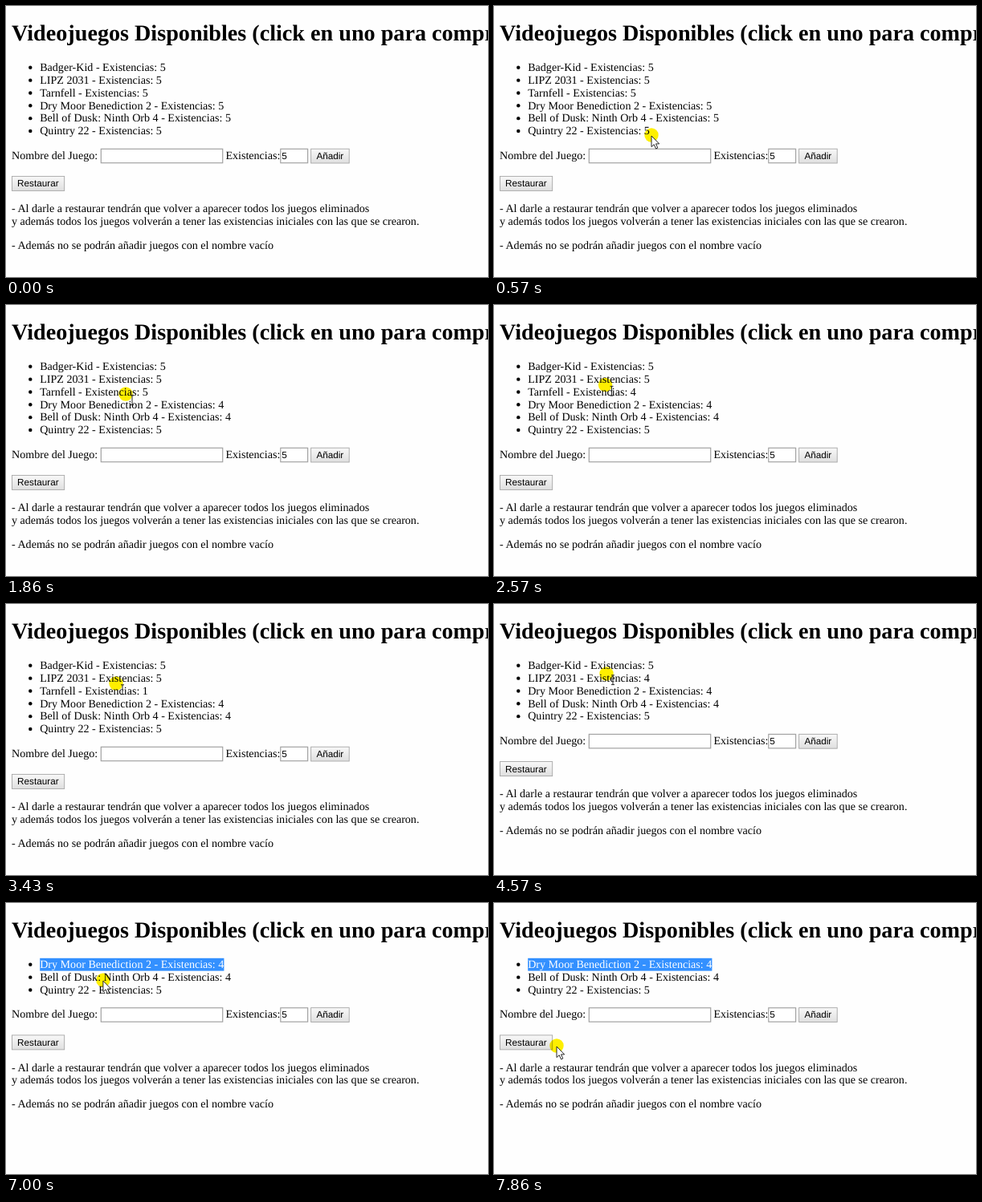
Animation of 600 by 338 pixels, one loop 8 s. Source, as an HTML page:

```html
<!DOCTYPE html>
<html lang="es">
<head>
<meta charset="utf-8">
<title>Videojuegos Disponibles</title>
<style>
  html, body { margin: 0; width: 100%; height: 100%; overflow: hidden; background: #fefefe; }
  svg { display: block; width: 100vw; height: 100vh; }
  text { font: 14.08px "Liberation Serif", "Times New Roman", serif; text-rendering: geometricPrecision; white-space: pre; }
  .title { font-size: 28.16px; font-weight: bold; }
  .ui { font: 11.73px "Liberation Sans", Arial, sans-serif; }
  .button { fill: url(#face); stroke: #a6a6a6; stroke-width: .9; }
  .field { fill: #fff; stroke: #a2a2a2; stroke-width: 1.2; }
  .halo { fill: #fff000; mix-blend-mode: multiply; }
</style>
</head>
<body>
<svg viewBox="0 0 600 338">
  <defs>
    <linearGradient id="face" x2="0" y2="1">
      <stop offset="0" stop-color="#f8f8f8"/>
      <stop offset="1" stop-color="#dfdfdf"/>
    </linearGradient>
  </defs>
  <rect width="600" height="338" fill="#fefefe"/>
  <text class="title" x="7" y="42.7">Videojuegos Disponibles (click en uno para comprar)</text>
  <g id="list"></g>
  <g id="below">
    <text x="7" y="191">Nombre del Juego:</text>
    <rect class="field" x="118.3" y="178.3" width="151.4" height="17.4"/>
    <text x="273.4" y="191">Existencias:</text>
    <rect class="field" x="341.8" y="178.3" width="33.8" height="17.4"/>
    <text class="ui" x="343.2" y="191">5</text>
    <rect class="button" x="379.6" y="178.2" width="47.6" height="17.8"/>
    <text class="ui" x="386.4" y="191">Añadir</text>
    <rect class="button" x="7.5" y="212.4" width="65.2" height="18"/>
    <text class="ui" x="14.1" y="225.4">Restaurar</text>
    <text x="7" y="257.2">- Al darle a restaurar tendrán que volver a aparecer todos los juegos eliminados</text>
    <text x="7" y="273">y además todos los juegos volverán a tener las existencias iniciales con las que se crearon.</text>
    <text x="7" y="303">- Además no se podrán añadir juegos con el nombre vacío</text>
  </g>
  <g id="pointer">
    <circle class="halo" r="8.7"/>
    <path id="arrow" d="M0 1V14.6L3.2 11.7L5.6 17L7.8 16L5.5 10.9H9.7Z" fill="#fff" stroke="#111" stroke-width=".9"/>
    <path id="beam" d="M6 1.8H10M8 1.8V13.6M6 13.6H10" fill="none" stroke="#222" stroke-width="1"/>
  </g>
</svg>
<script>
const LOOP = 8000, BEAT = 1000 / 7, ROW = 15.84, FIRST = 81;
const SELECT_AT = 37, BEAM_FROM = 6, BEAM_TO = 49;

// Each click takes one unit away; a game with none left is removed.
const games = [
  { name: "Badger-Kid", clicks: [42, 44, 46, 47, 48] },
  { name: "LIPZ 2031", clicks: [30, 33, 34, 36, 37] },
  { name: "Tarnfell", clicks: [16, 19, 21, 23, 26] },
  { name: "Dry Moor Benediction 2", clicks: [11], selectable: true },
  { name: "Bell of Dusk: Ninth Orb 4", clicks: [8] },
  { name: "Quintry 22", clicks: [] }
];

// Pointer stops: beat, x, y
const path = [
  [0, 660, 245], [1, 592, 232], [4, 196, 161], [7, 172, 132], [8, 170, 131],
  [10, 154, 117], [11, 151, 115], [13, 149, 111], [16, 140, 101], [19, 138, 99],
  [24, 137, 99], [26, 137, 99], [29, 140, 87], [37, 140, 87], [40, 138, 71],
  [48, 138, 71], [51, 72, 168], [52, 72, 168], [55, 78, 178], [56, 78, 178]
];

const $ = id => document.getElementById(id);

function add(parent, tag, attrs) {
  const el = document.createElementNS("http://www.w3.org/2000/svg", tag);
  for (const key in attrs) el.setAttribute(key, attrs[key]);
  return parent.appendChild(el);
}

const show = (el, on) => el.setAttribute("visibility", on ? "visible" : "hidden");
const move = (el, x, y) => el.setAttribute("transform", `translate(${x} ${y})`);

for (const game of games) {
  game.row = add($("list"), "g", {});
  game.mark = add(game.row, "rect", { x: 42.2, y: -12.2, width: 229.2, height: ROW, fill: "#3390ff" });
  add(game.row, "circle", { cx: 30.3, cy: -4.2, r: 2.2 });
  game.label = add(game.row, "text", { x: 42.2, y: 0 });
}

function pointerAt(beat) {
  const i = Math.max(1, path.findIndex(stop => stop[0] >= beat));
  const [b0, x0, y0] = path[i - 1], [b1, x1, y1] = path[i];
  const u = (beat - b0) / (b1 - b0), e = u * u * (3 - 2 * u);
  return [x0 + (x1 - x0) * e, y0 + (y1 - y0) * e];
}

function draw(time) {
  const beat = Math.floor((time % LOOP) / BEAT + .03);
  let rows = 0;
  for (const game of games) {
    const left = 5 - game.clicks.filter(click => click <= beat).length;
    const selected = Boolean(game.selectable) && beat >= SELECT_AT;
    game.row.setAttribute("display", left ? "inline" : "none");
    show(game.mark, selected);
    game.label.setAttribute("fill", selected ? "#fff" : "#000");
    game.label.textContent = `${game.name} - Existencias: ${left}`;
    move(game.row, 0, FIRST + rows * ROW);
    if (left) rows++;
  }
  move($("below"), 0, (rows - games.length) * ROW);
  move($("pointer"), ...pointerAt(beat));
  const beam = beat >= BEAM_FROM && beat < BEAM_TO;
  show($("beam"), beam);
  show($("arrow"), !beam);
}

const start = performance.now();
function tick() {
  draw(performance.now() - start);
  requestAnimationFrame(tick);
}
tick();
</script>
</body>
</html>
```
